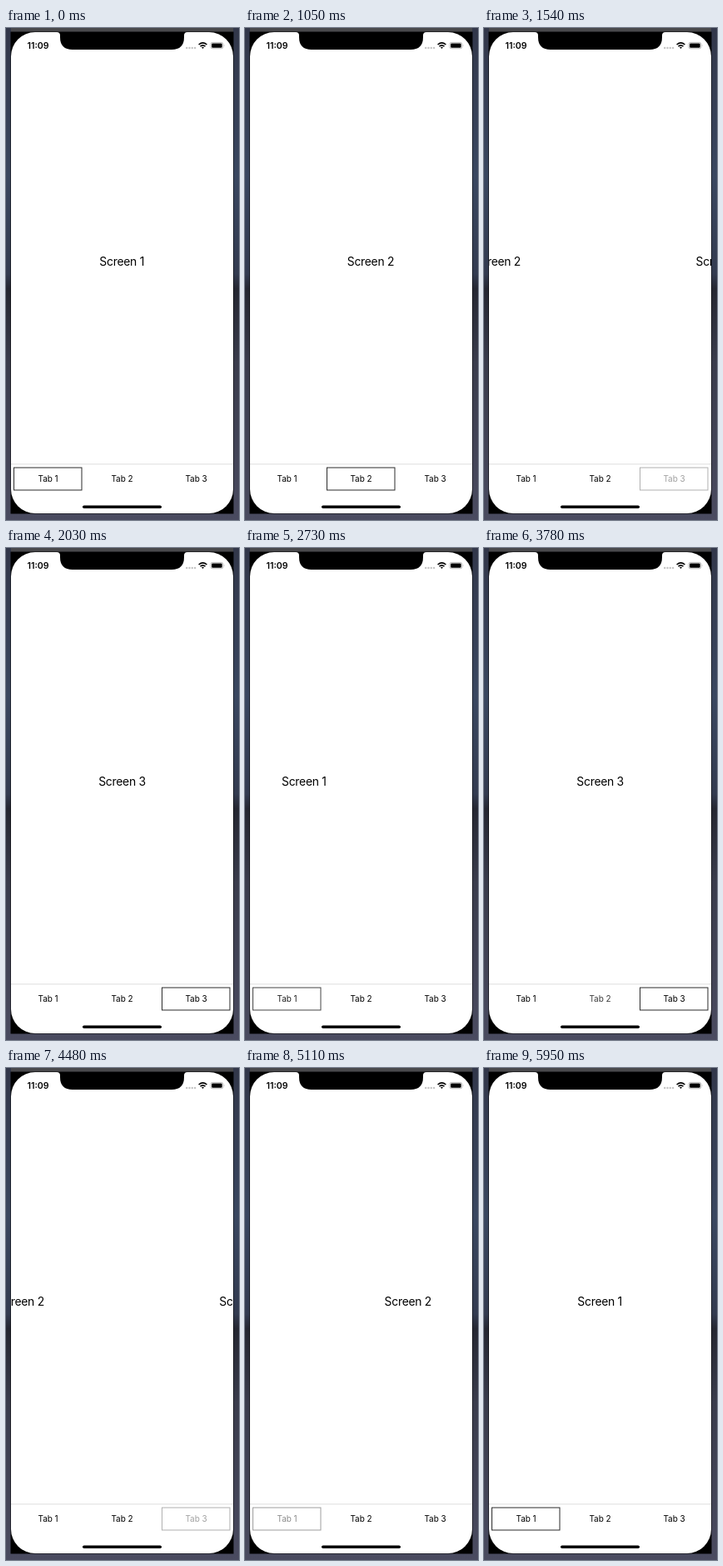
An HTML page for the animation above (6.09 s loop, 280 by 592 pixels).

```html
<!DOCTYPE html>
<html lang="en">
<head>
<meta charset="utf-8">
<title>Tabs</title>
<style>
  html, body { margin: 0; width: 100%; height: 100%; overflow: hidden; background: #2b2e3d; }
  svg { display: block; width: 280px; height: 592px; font-family: Inter, Roboto, sans-serif; }
  #pages { font-size: 13.9px; letter-spacing: -.27px; text-anchor: middle; }
  #tabs { font-size: 10px; letter-spacing: -.05px; text-anchor: middle; }
  #tabs rect { fill: none; stroke: #2b2b2b; }
</style>
</head>
<body>
<svg viewBox="0 0 280 592">
  <defs>
    <linearGradient id="sky" x2="0" y2="1">
      <stop offset="0" stop-color="#32374a"/>
      <stop offset=".3" stop-color="#3a4760"/>
      <stop offset=".5" stop-color="#333b50"/>
      <stop offset=".53" stop-color="#252732"/>
      <stop offset=".68" stop-color="#3a3c4c"/>
      <stop offset="1" stop-color="#4a4b60"/>
    </linearGradient>
    <clipPath id="screen"><rect x="6" y="5" width="267" height="579"/></clipPath>
  </defs>

  <rect width="280" height="592" fill="url(#sky)"/>
  <rect x="6" width="267" height="5" fill="#49494c"/>
  <rect x="5.5" y="4.5" width="268" height="580"/>
  <rect x="6" y="5" width="267" height="579" rx="29" fill="#fff"/>
  <path d="M61 5q4 0 4 4v2q0 15 15 15h119q15 0 15-15V9q0-4 4-4z"/>

  <text x="25.5" y="25" font-size="10.6" font-weight="600">11:09</text>
  <g fill="#c4c4c4">
    <circle cx="217.2" cy="24" r="1.2"/><circle cx="220.5" cy="24" r="1.2"/>
    <circle cx="223.8" cy="24" r="1.2"/><circle cx="227.1" cy="24" r="1.2"/>
  </g>
  <g fill="none" stroke="#000" stroke-width="1.6">
    <path d="M231.6 20q4.9-4.4 9.8 0M233.5 22.2q3-2.6 6 0"/>
    <path d="M235 23.3q1.5-1.2 3 0l-1.5 1.7z" fill="#000" stroke="none"/>
  </g>
  <rect x="245.9" y="17.4" width="15" height="7.4" rx="2.2" fill="none" stroke="#aaa" stroke-width=".8"/>
  <rect x="247.1" y="18.5" width="12.6" height="5.2" rx="1.2"/>
  <path d="M261.9 19.8q1.1 1.3 0 2.6z" fill="#aaa"/>

  <g clip-path="url(#screen)">
    <g id="pages"></g>
  </g>
  <path d="M6 524.8H273" stroke="#dedede"/>
  <g id="tabs"></g>
  <rect x="92" y="574.5" width="95" height="3.6" rx="1.8"/>
</svg>
<script>
const LOOP = 6090, PAGE = 267, HOLD = 115, FADE_IN = 150, FADE_OUT = 250, DIM = .2;
// [release time, tab pressed]
const taps = [[790, 1], [1480, 2], [2555, 0], [3201, 2], [3840, 1], [4421, 2], [5025, 0]];
const pages = document.getElementById('pages');
const tabs = document.getElementById('tabs');

for (let i = 0; i < 3; i++) {
  const mid = 50.5 + 89 * i;
  pages.innerHTML += `<text x="${139.2 + PAGE * i}" y="286">Screen ${i + 1}</text>`;
  tabs.innerHTML += `<g><rect x="${mid - 41}" y="529" width="81.5" height="27"/>
    <text x="${mid}" y="545.7">Tab ${i + 1}</text></g>`;
}

const ease = p => p < .5 ? 2 * p * p : 1 - 2 * (1 - p) ** 2;
const clamp = p => Math.min(1, Math.max(0, p));
// Share of the way left on an overdamped spring, t in seconds
const spring = t => (93.5 * Math.exp(-12.5 * t) - 12.5 * Math.exp(-93.5 * t)) / 81;

function press(t) {
  const low = 1 - (1 - DIM) * ease(clamp((Math.min(t, 0) + HOLD) / FADE_IN));
  return low + (1 - low) * ease(clamp(t / FADE_OUT));
}

function draw(now) {
  const t = now % LOOP;
  const alpha = [1, 1, 1];
  let active = 0, pos = 0;
  for (const [at, tab] of taps) {
    if (t > at - HOLD) alpha[tab] = press(t - at);
    if (t < at) continue;
    pos = tab + (active - tab) * spring((t - at) / 1000);
    active = tab;
  }
  pages.setAttribute('transform', `translate(${-pos * PAGE})`);
  [...tabs.children].forEach((g, i) => {
    g.setAttribute('opacity', alpha[i]);
    g.firstChild.setAttribute('visibility', i === active ? 'visible' : 'hidden');
  });
}

const start = performance.now();
function tick() {
  draw(performance.now() - start);
  requestAnimationFrame(tick);
}
tick();
</script>
</body>
</html>
```
